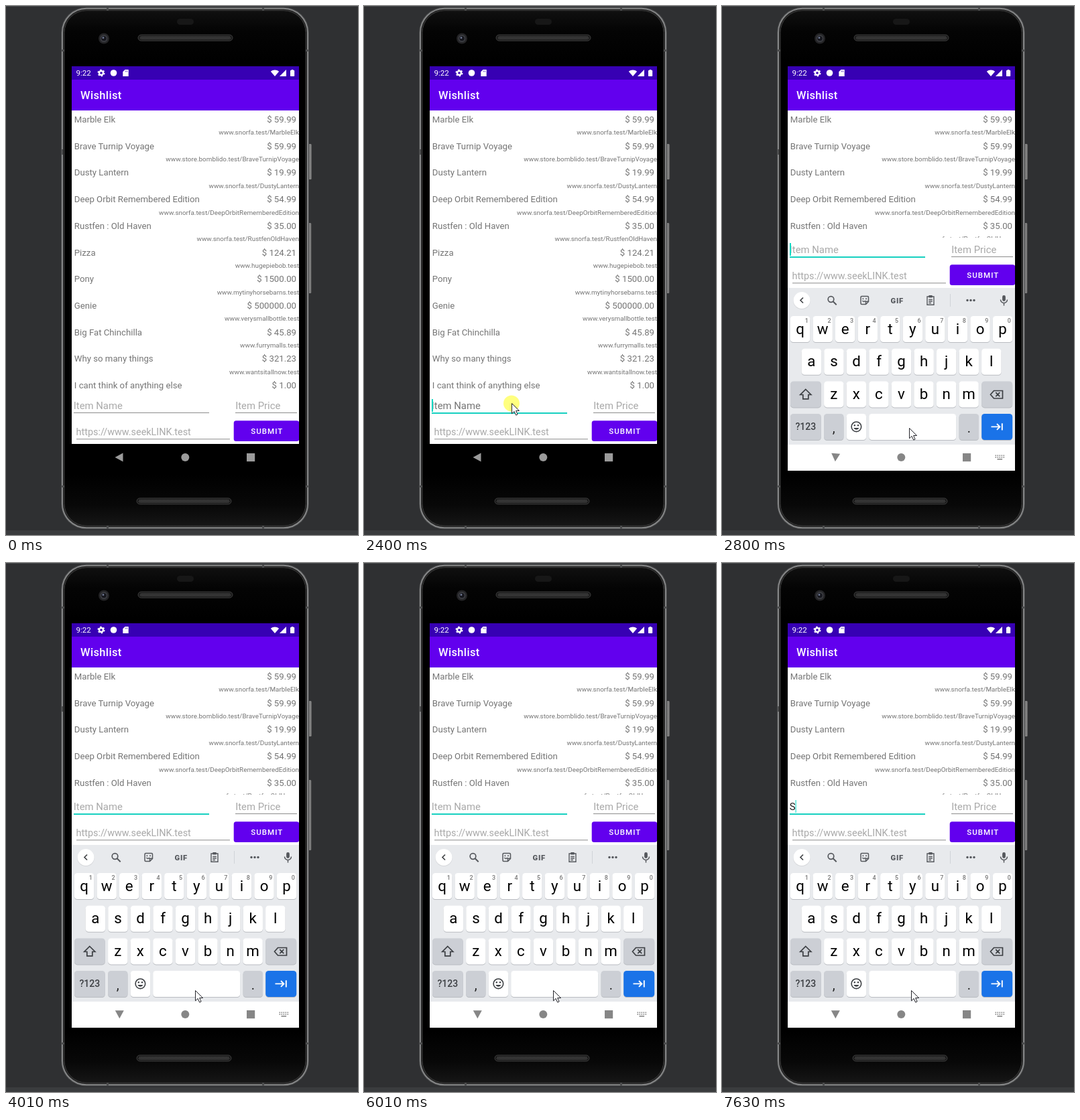
Recreate the animation shown at these times as an HTML page. Size 525 by 790 pixels, loop 8 s.

```html
<!DOCTYPE html>
<html lang="en">
<head>
<meta charset="utf-8">
<title>Wishlist</title>
<style>
  html, body { margin: 0; width: 100%; height: 100%; overflow: hidden; background: #2f3032; }
  svg { display: block; width: 525px; height: 790px; font-family: Roboto, sans-serif; }
</style>
</head>
<body>
<svg id="stage" viewBox="0 0 525 790" xmlns="http://www.w3.org/2000/svg"></svg>
<script>
const LOOP = 8000, FOCUS = 2400, OPENING = 2600, OPEN = 2800, SETTLED = 3000, TYPED = 7630;
const blinks = [FOCUS, SETTLED, 3610, 4010, 4610, 5010, 5610, 6010, 6630, 7030, TYPED];
const pointerSteps = [
  [1000, 363, 748], [1200, 254, 642], [1400, 226, 603], [1600, 220, 593],
  [OPENING, 235, 601], [OPEN, 279, 630], [SETTLED, 282, 638]
];
const items = [
  ['Marble Elk', '59.99', 'snorfa.test/MarbleElk'],
  ['Brave Turnip Voyage', '59.99', 'store.bomblido.test/BraveTurnipVoyage'],
  ['Dusty Lantern', '19.99', 'snorfa.test/DustyLantern'],
  ['Deep Orbit Remembered Edition', '54.99', 'snorfa.test/DeepOrbitRememberedEdition'],
  ['Rustfen : Old Haven', '35.00', 'snorfa.test/RustfenOldHaven'],
  ['Pizza', '124.21', 'hugepiebob.test'],
  ['Pony', '1500.00', 'mytinyhorsebarns.test'],
  ['Genie', '500000.00', 'verysmallbottle.test'],
  ['Big Fat Chinchilla', '45.89', 'furrymalls.test'],
  ['Why so many things', '321.23', 'wantsitallnow.test'],
  ['I cant think of anything else', '1.00', '']
];

const rect = (x, y, w, h, fill, rx = 0, more = '') =>
  `<rect x="${x}" y="${y}" width="${w}" height="${h}" rx="${rx}" fill="${fill}" ${more}/>`;
const circle = (x, y, r, fill, more = '') =>
  `<circle cx="${x}" cy="${y}" r="${r}" fill="${fill}" ${more}/>`;
const path = (d, fill, more = '') => `<path d="${d}" fill="${fill}" ${more}/>`;
const line = (d, color, width = 1.6) =>
  path(d, 'none', `stroke="${color}" stroke-width="${width}"`);
const text = (x, y, size, fill, str, more = '') =>
  `<text x="${x}" y="${y}" font-size="${size}" fill="${fill}" ${more}>${str}</text>`;
const END = 'text-anchor="end"', MID = 'text-anchor="middle"', MEDIUM = 'font-weight="500"';

const defs = `<defs>
  <linearGradient id="body" x2="0" y2="1">
    <stop stop-color="#101010"/><stop offset=".04" stop-color="#040404"/>
    <stop offset=".1" stop-color="#000"/><stop offset=".9" stop-color="#000"/>
    <stop offset=".96" stop-color="#080808"/><stop offset="1" stop-color="#161616"/>
  </linearGradient>
  <linearGradient id="button"><stop stop-color="#4a4a4a"/><stop offset=".6" stop-color="#8b8b8b"/><stop offset="1" stop-color="#5c5c5c"/></linearGradient>
  <pattern id="mesh" width="4" height="4" patternUnits="userSpaceOnUse">
    <path d="M0 0L2 2L0 4M2 0L4 2L2 4" fill="none" stroke="#555" stroke-width=".8"/>
  </pattern>
  <clipPath id="listClip"><rect id="listArea" x="98" y="156" width="339.5" height="421"/></clipPath>
  <clipPath id="screen"><rect x="98" y="90" width="339" height="604"/></clipPath>
</defs>`;

const speaker = (x, y) =>
  rect(x, y, 141, 9, '#1d1d1d', 4.5, 'stroke="#3c3c3c"') + rect(x + 3, y + 2, 135, 5, 'url(#mesh)', 2.5);

function phone() {
  const seams = [[82, 65, 5, 3], [82, 716, 5, 3], [447, 65, 5, 3], [447, 716, 5, 3],
    [150, 2, 3, 5], [382, 2, 3, 5], [150, 776, 3, 5], [382, 776, 3, 5], [82, 214, 3, 8]];
  return rect(0, 0, 525, 1, '#47494b') + rect(0, 783, 525, 7, '#3a3c3e')
    + rect(450, 206, 6, 53, 'url(#button)', 1.5) + rect(450, 324, 5.5, 105, 'url(#button)', 1.5)
    + rect(82, 1.7, 370, 779.6, '#454647', 38)
    + rect(84, 3.7, 366, 775.6, '#232323', 36, 'stroke="#858687" stroke-width="2"')
    + rect(87, 6.7, 360, 769.6, 'url(#body)', 33, 'stroke="#3a3a3a"')
    + seams.map(s => rect(...s, '#4c4d4e')).join('')
    + rect(255, 19, 25, 9, '#171717', 4.5)
    + circle(146, 48.5, 8, '#242426') + circle(146, 48.5, 5.5, '#3a3b40')
    + circle(146, 48.5, 3.6, '#15161c') + circle(145, 47.5, 1.4, '#6e7690')
    + speaker(197, 43) + speaker(195, 735);
}

function appBars() {
  return rect(98, 90, 339, 20, '#3700b3') + rect(98, 110, 339, 46, '#6200ee')
    + text(104.5, 104.1, 11.55, '#fff', '9:22')
    + circle(142, 100, 3, 'none', 'stroke="#fff" stroke-width="2.4"')
    + circle(142, 100, 4.7, 'none', 'stroke="#fff" stroke-width="1.6" stroke-dasharray="2.46 2.46"')
    + circle(160.5, 100, 4.8, '#fff')
    + path('M177.5 95h5.2v10h-8.4v-6.8z', '#fff') + line('M178.3 96.5v2M180.5 96.5v2', '#3700b3', .8)
    + path('M401 105L394.8 97.7a9.5 9.5 0 0 1 12.4 0z', '#fff')
    + path('M408 105h10v-10z', '#fff') + rect(424, 96, 6.2, 9, '#fff', .8) + rect(425.7, 95, 2.8, 2, '#fff')
    + text(111, 139.3, 16.5, '#fff', 'Wishlist', MEDIUM + ' letter-spacing=".35"');
}

function list() {
  return items.map(([name, price, site], i) => {
    const y = 174 + i * 39.7;
    return text(101.8, y, 13.2, '#757575', name) + text(433, y, 13.2, '#757575', '$ ' + price, END)
      + (site && text(437, y + 18.4, 9.9, '#757575', 'www.' + site, END));
  }).join('');
}

function form() {
  return rect(98, 579, 339, 75, '#fff')
    + text(100.8, 602, 14.85, '#a9a9a9', 'Item Name', 'id="nameHint"')
    + text(100.8, 602, 14.85, '#1c1c1c', 'S', 'id="typed"')
    + rect(101, 607, 202, 1, '#8c8c8c', 0, 'id="nameLine"')
    + text(342.2, 602, 14.85, '#a9a9a9', 'Item Price') + rect(342, 607, 92, 1, '#8c8c8c')
    + text(104.6, 641.3, 14.4, '#a9a9a9', 'https://www.seekLINK.test') + rect(105, 646.3, 229, 1, '#8c8c8c')
    + rect(339.7, 619.2, 97.6, 30.8, '#6200ee', 3.5)
    + text(389.3, 638.7, 11.55, '#fff', 'SUBMIT', `${MID} ${MEDIUM} letter-spacing="1.03"`)
    + rect(101, 587, 2, 19, '#03dac5', 0, 'id="caret"');
}

const key = (x, y, w, fill = '#fff') =>
  rect(x, y + 1, w, 39, '#b9bcc1', 4.5) + rect(x, y, w, 39, fill, 4.5);

function keyboard() {
  const PITCH = 33.55, GREY = '#cccfd5', INK = '#55585d', DARK = '#3c3f43';
  const rows = [['qwertyuiop', 116.6, 463], ['asdfghjkl', 133.4, 511.7], ['zxcvbnm', 166.8, 560.4]];
  const letters = rows.map(([chars, left, y], r) => [...chars].map((c, i) => {
    const x = left + i * PITCH;
    return key(x - 14.7, y, 29.4) + text(x, y + 26.6, 22.3, '#000', c, MID)
      + (r ? '' : text(x + 9.8, y + 9.8, 9, '#777', (i + 1) % 10, `${MID} ${MEDIUM}`));
  }).join('')).join('');
  const tools = circle(119, 440.2, 12.8, '#d5d7da') + circle(119, 439.5, 12.5, '#fff')
    + line('M121 435.5l-4 4 4 4', DARK)
    + circle(162.5, 438, 4.3, 'none', `stroke="${INK}" stroke-width="1.7"`) + line('M165.7 441.2l5 5', INK, 2)
    + line('M208.5 433.5h8.5q1.5 0 1.5 1.5v6.5l-4 4h-6q-1.5 0-1.5-1.5v-9q0-1.5 1.5-1.5zM214.5 445v-3.7h4M209.5 440q2.3 3 4.5 0', INK, 1.5)
    + circle(210.4, 437.3, 1, INK) + circle(215, 437.3, 1, INK)
    + text(261.2, 443.6, 11.2, INK, 'GIF', `${MID} font-weight="900" letter-spacing=".7"`)
    + line('M306 434h10v12.3h-10zM308.3 438.5h5.5M308.3 441h5.5M308.3 443.5h3.7', INK, 1.4) + rect(308.2, 432, 5.6, 3.6, INK, 1)
    + rect(340, 430, 1, 19, '#d0d3d8')
    + [366, 371, 376].map(x => circle(x, 439.5, 1.7, INK)).join('')
    + rect(418.1, 432, 4.8, 9, INK, 2.4) + line('M415.5 438.5a5 5 0 0 0 10 0M420.5 443.5v4', INK, 1.5);
  const special = key(102, 560.4, 45.8, GREY) + key(387.2, 560.4, 46, GREY)
    + line('M124.8 572.5l8 8h-4v6.3h-8v-6.3h-4z', DARK, 1.7)
    + line('M405.5 574.5h13v11.5h-13l-5-5.75zM408.3 577.2l6 6M414.3 577.2l-6 6', DARK, 1.7)
    + key(102, 609, 45.8, GREY) + text(124.9, 633.4, 14, DARK, '?123', `${MID} ${MEDIUM}`)
    + key(152.1, 609, 29.4, GREY) + text(166.8, 637, 20, '#222', ',', MID)
    + key(185.7, 609, 29.4) + circle(200.4, 628.3, 7.3, 'none', `stroke="${DARK}" stroke-width="1.6"`)
    + circle(197.8, 626.3, 1.2, DARK) + circle(203, 626.3, 1.2, DARK) + path('M196.4 630a4.3 4.3 0 0 0 8 0z', DARK)
    + key(219.2, 609, 130) + key(353.6, 609, 29.4, GREY) + text(368.3, 637, 20, '#222', '.', MID)
    + key(387.2, 609, 46, '#1a73e8') + line('M401.5 628.4h12.5M410 624l4.4 4.4-4.4 4.4M417.8 623.2v10.4', '#fff', 1.9);
  return rect(98, 421, 339, 234, '#e8eaed') + tools + letters + special;
}

function navBar() {
  const tinyKeys = [407.5, 410.5, 413.5, 416.5, 419.5]
    .map(x => rect(x, 670.5, 1.6, 1.6, 'currentColor') + rect(x, 673.2, 1.6, 1.6, 'currentColor')).join('');
  return rect(98, 654, 339, 40, '#000', 0, 'id="navBack"')
    + `<g id="navIcons">${path('M162.5 674L174.5 667.5V680.5z', 'currentColor', 'id="back"')}`
    + circle(267.3, 674, 6, 'currentColor') + rect(359, 668, 12.2, 12.2, 'currentColor')
    + `<g id="tinyKeys">${tinyKeys}${rect(410.5, 676, 7.6, 1.6, 'currentColor')}</g></g>`;
}

// The keyboard lies over the navigation bar, which shows through while it fades in.
const stage = document.getElementById('stage');
stage.innerHTML = defs + phone()
  + `<g clip-path="url(#screen)">${rect(98, 156, 339, 538, '#fff')}${appBars()}
     <g clip-path="url(#listClip)">${list()}</g><g id="form">${form()}</g>
     ${navBar()}<g id="keyboard">${keyboard()}</g></g>`
  + circle(220, 593.5, 12, '#ff0', 'id="tap" fill-opacity=".5"')
  + path('M.5 .5V15.8l3.6-3.4 2.6 5.7 2.4-1.1-2.5-5.5h4.9z', '#fff', 'id="pointer" stroke="#26262c"');

const el = id => document.getElementById(id);
const set = (id, attrs) => Object.entries(attrs).forEach(([k, v]) => el(id).setAttribute(k, v));
const show = (id, on) => set(id, { visibility: on ? 'visible' : 'hidden' });

function draw(t) {
  const focused = t >= FOCUS, raised = t >= OPENING, opening = raised && t < OPEN;
  const open = t >= OPEN, typed = t >= TYPED;

  set('listArea', { height: raised ? 190 : 421 });
  set('form', { transform: `translate(0 ${raised ? -233 : 0})` });
  set('nameLine', focused ? { height: 2, fill: '#16d0c0' } : { height: 1, fill: '#8c8c8c' });
  set('nameHint', { fill: focused && !raised ? '#757575' : '#a9a9a9' });
  show('nameHint', !typed);
  show('typed', typed);
  set('caret', { x: typed ? 109.6 : 101, width: typed ? 1 : 2 });
  show('caret', blinks.filter(b => b <= t).length % 2);

  show('keyboard', raised);
  set('keyboard', { transform: `translate(0 ${opening ? 85 : 0})`, opacity: opening ? .67 : 1 });

  set('navBack', { fill: open ? '#fff' : '#000' });
  set('navIcons', { color: open ? '#868686' : '#9b9b9b' });
  const turn = open ? (t < SETTLED ? -86 : -90) : 0;
  set('back', { transform: `rotate(${turn} 169 673.7)` });
  show('tinyKeys', raised);

  show('tap', focused && !raised);
  const step = pointerSteps.filter(p => p[0] <= t).pop();
  show('pointer', step);
  if (step) set('pointer', { transform: `translate(${step[1]} ${step[2]})` });
}

function tick() {
  draw(performance.now() % LOOP);
  requestAnimationFrame(tick);
}
tick();
</script>
</body>
</html>
```
